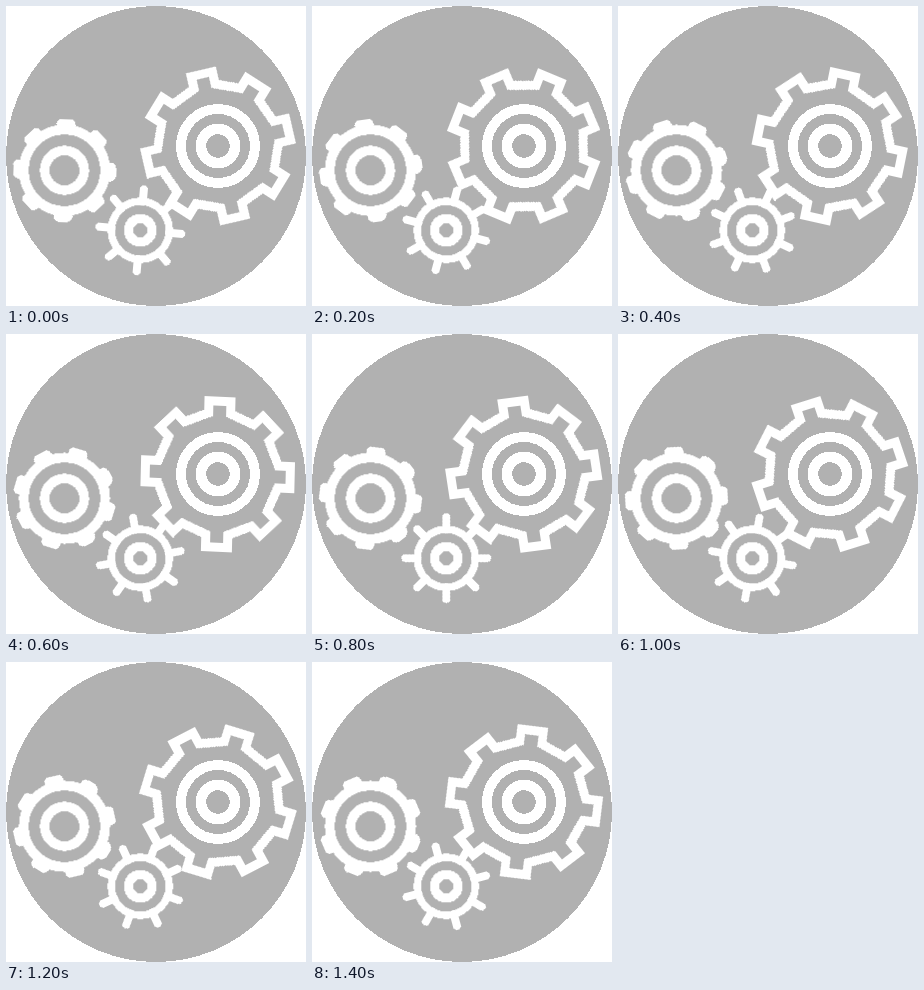
These frames come from a looping animation (300x300 px, 1.6 s). An HTML page:

```html
<!DOCTYPE html>
<html lang="en">
<head>
<meta charset="utf-8">
<title>Gears</title>
<style>
  html, body { margin: 0; width: 100%; height: 100%; overflow: hidden; background: #fff; }
  svg { display: block; width: 100%; height: 100%; shape-rendering: crispEdges; }
  .gear { fill: none; stroke: #fff; }
  .spin { animation: spin 1600ms steps(8, end) infinite; }
  .ccw { --turn: -80deg; }
  .cw { --turn: 80deg; }
  @keyframes spin {
    from { transform: rotate(var(--start)); }
    to { transform: rotate(calc(var(--start) + var(--turn))); }
  }
</style>
</head>
<body>
<svg viewBox="0 0 300 300">
  <circle cx="150" cy="150" r="150" fill="#b1b1b1"/>

  <g class="gear" transform="translate(212 140)" stroke-width="9">
    <g class="spin ccw" style="--start: 0deg">
      <!-- the rim is slightly oval -->
      <path id="large" transform="scale(.985 1.01) rotate(32)"/>
    </g>
    <circle r="37" stroke-width="10"/>
    <circle r="17" stroke-width="10.5"/>
  </g>

  <g class="gear" transform="translate(58.5 164.3)" stroke-width="9.7">
    <g id="medium" class="spin ccw" style="--start: 2deg"></g>
    <circle r="40.7"/>
    <circle r="19.8"/>
  </g>

  <g class="gear" transform="translate(134.3 224.3)" stroke-width="7.5">
    <g id="small" class="spin cw" style="--start: 5deg"></g>
    <circle r="29"/>
    <circle r="11.7" stroke-width="9.4"/>
  </g>
</svg>
<script>
  const TEETH = 8;
  const byId = id => document.getElementById(id);

  // Repeats one tooth, drawn pointing up, all the way round.
  function addTeeth(id, tooth) {
    let parts = '';
    for (let i = 0; i < TEETH; i++) {
      parts += `<g transform="rotate(${i * 360 / TEETH})">${tooth}</g>`;
    }
    byId(id).innerHTML = parts;
  }

  // Closed outline with straight-sided teeth.
  function gearOutline(half, base, tip) {
    const tooth = [[-half, -base], [-half, -tip], [half, -tip], [half, -base]];
    const points = [];
    for (let i = 0; i < TEETH; i++) {
      const a = i * 2 * Math.PI / TEETH, c = Math.cos(a), s = Math.sin(a);
      for (const [x, y] of tooth) {
        points.push(`${(x * c - y * s).toFixed(2)} ${(x * s + y * c).toFixed(2)}`);
      }
    }
    return 'M' + points.join('L') + 'Z';
  }

  byId('large').setAttribute('d', gearOutline(11, 60.5, 73));
  addTeeth('medium', '<rect x="-9.5" y="-51.5" width="19" height="12" rx="5" fill="#fff" stroke="none"/>');
  addTeeth('small', '<path d="M0 -29V-41" stroke-linecap="round"/>');
</script>
</body>
</html>
```
